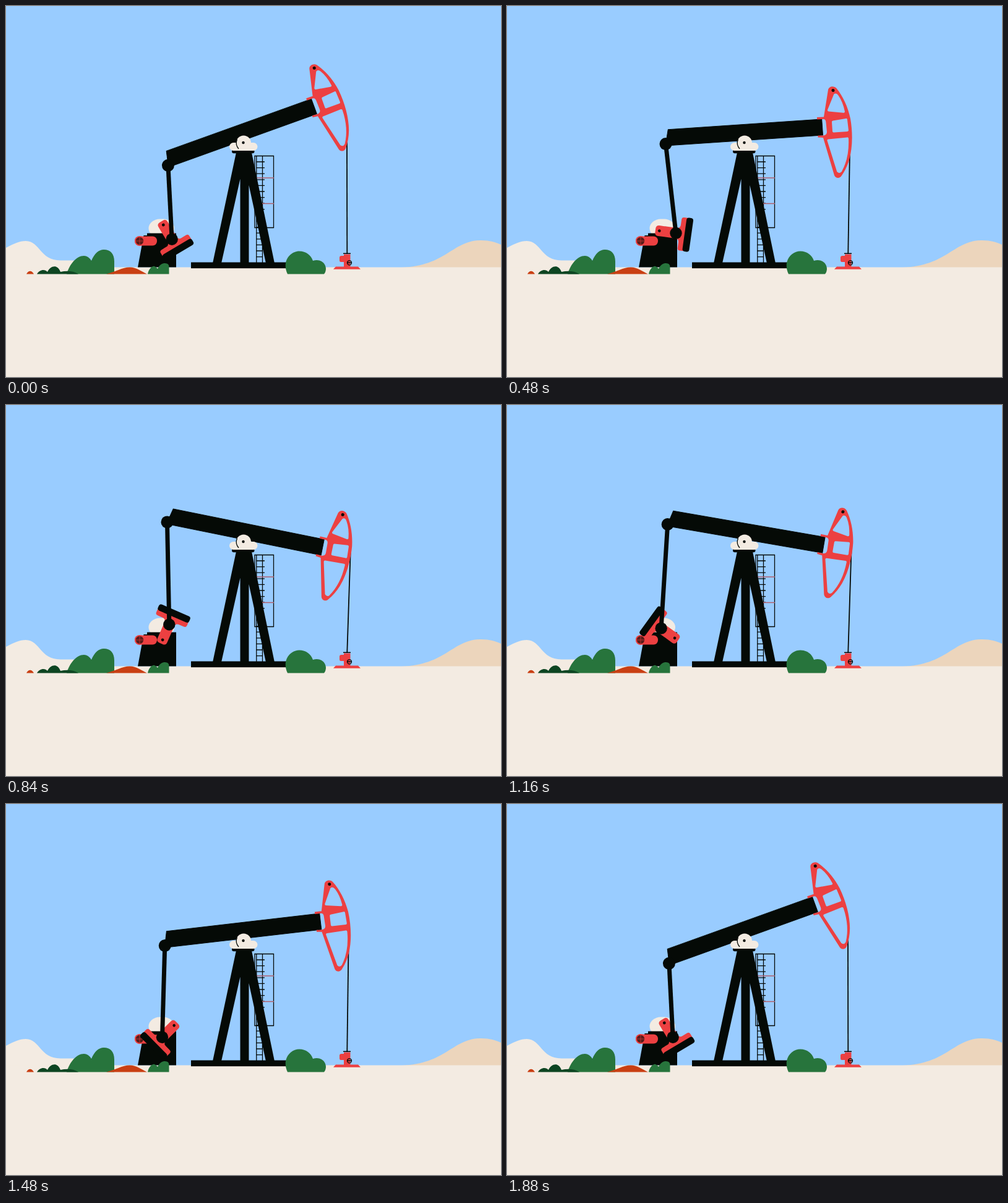
Animation, 800 px wide and 600 px high, one loop 1920 ms. Source, as an HTML page:

```html
<!DOCTYPE html>
<html lang="en">
<head>
<meta charset="utf-8">
<title>Pump jack</title>
<style>
  html, body { margin: 0; height: 100%; overflow: hidden; background: #99ccff; }
  svg { display: block; width: 800px; height: 600px; }
  .ink { fill: #050a06; }
  .red { fill: #ec4041; }
  .sand { fill: #f3ebe2; }
  .sky { fill: #99ccff; stroke: #99ccff; stroke-width: 4; stroke-linejoin: round; }
  .leaf { fill: #27743c; }
  .dark { fill: #0d4522; }
  .clay { fill: #c93f13; }
  .line { fill: none; stroke: #050a06; }
</style>
</head>
<body>
<svg viewBox="0 0 800 600">
  <rect width="800" height="600" fill="#99ccff"/>

  <!-- dunes and ground -->
  <path class="sand" d="M0 391C14 384 21 380 32 380C56 381 54 411 88 411.500H120L150 424H0Z"/>
  <path fill="#ecd5bc" d="M640 423C712 420 722 379 768 379C782 379 791 382 800 386V424H640Z"/>
  <rect class="sand" y="422.500" width="800" height="178"/>

  <!-- ladder and cage -->
  <path class="line" stroke-width="1.300" d="M402 242.500H432.500V358.500H402ZM404.800 242V415M414.500 242V415"/>
  <path class="line" id="rungs" stroke-width="1.300"/>
  <path fill="none" stroke="#b0606c" stroke-width="1.300" d="M405 278H433M405 319.500H433"/>

  <!-- tower -->
  <path class="ink" d="M372 237H388L348 416H334ZM381 237H397L434 416H420ZM378.500 237H392.500V416H378.500Z"/>
  <rect class="ink" x="299" y="414.500" width="155" height="9.700"/>

  <!-- motor -->
  <rect class="sand" x="230.500" y="344.500" width="41.500" height="30" rx="18"/>
  <path class="ink" d="M228 367.500H275V371H228ZM222.500 371H275V422.500H213Z"/>
  <rect class="red" x="208" y="372.500" width="36" height="15" rx="7"/>
  <circle class="red" cx="216" cy="380" r="8"/>
  <circle cx="216" cy="380" r="6.200" fill="#5a1a18"/>
  <path stroke="#c93a38" stroke-width=".8" d="M210 380H222M216 374V386"/>

  <!-- rope, beam and head -->
  <line class="line" id="rope" y1="220" x2="551.300" y2="400" stroke-width="1.800"/>
  <g id="beam">
    <path class="ink" stroke="#050a06" stroke-linejoin="round" d="M260.300 199.700L508.700 183.100L510.500 209L256.100 226Z"/>
    <path class="red" d="M519 136C520 130 528 128.500 532.500 133C543 146 551 163 555 182C559 205 558.500 230 553 249C550 259 546 267 541 274C538 279.500 531.500 279.500 529 274L511 213L502.500 212.500V209.500L511 209.500Q517.500 209 517 203L515.500 188Q515 182.500 510 183L501 183.500V180L512 179.500Z"/>
    <path class="sky" d="M530 144Q532 143 534 146Q541 156 544 171L520 168.500Z"/>
    <path class="sky" d="M527 187.500L548 184L550 201L528 202.500Z"/>
    <path class="sky" d="M519.500 217.500L550 214.500C551 236 547 253 539 267Q537 269 535 267Z"/>
    <circle class="ink" cx="527" cy="136.500" r="2.500"/>
  </g>

  <!-- pivot -->
  <rect class="ink" x="365" y="232" width="36.500" height="6.300" rx="3"/>
  <rect class="sand" x="361" y="221" width="45.500" height="13" rx="6.500"/>
  <circle class="sand" cx="384" cy="221.500" r="12"/>
  <path class="line" stroke-width="1.300" d="M373.500 215.500Q370 224 376 231"/>
  <circle class="ink" cx="383.500" cy="221" r="2.200"/>

  <!-- crank and rod -->
  <g id="crank">
    <path class="red" d="M-1-8.500H28Q33-9 33-14V-23Q33-27 37-27H43V27H37Q33 27 33 23V14Q33 9 28 8.500H-1Q-6.500 8.500-6.500 3V-3Q-6.500-8.500-1-8.500Z"/>
    <rect class="ink" x="41" y="-27.500" width="11" height="55" rx="4"/>
    <circle class="ink" r="2.300"/>
  </g>
  <line class="line" id="rod" stroke-width="7"/>
  <circle class="ink" id="joint" r="10"/>
  <circle class="ink" id="pin" r="9.700"/>

  <!-- wellhead -->
  <path class="red" d="M533 421.500H546V414H541Q539 414 539 411V407Q539 404 542 404H546V401.500H556.500V421.500H569L573 425.800H529Z"/>
  <path class="line" stroke-width="1.600" d="M545 400.300H557M551.500 415.300H558.500"/>
  <circle class="line" cx="555" cy="415.300" r="3.500" stroke-width="1.300"/>

  <!-- plants -->
  <path class="leaf" d="M98 433.500C103 417 114 404 126 404Q133 404 138 412C143 400 150 394 158 394C169 394 175 401 175 413V433.500Z"/>
  <path class="leaf" d="M229 433.500C231 425 236 420 240 421Q243 422 245 425C248 419 252 416 257 416Q263.500 416 263.500 422V433.500Z"/>
  <path class="leaf" d="M455 433.500C445 412 460 396.500 474 396.500C485 396.500 493 403 496 412C508 408 517 416 517 425Q517 430 514 433.500Z"/>
  <path class="dark" d="M50 433.500C54 426 63 425 67 430C72 420 83 417 88 430C98 428 108 428 117 433.500Z"/>
  <path class="clay" d="M162 433.500C177 430 188 422.500 200 422.500C211 422.500 220 430 228 433.500ZM33 433.500C36 427 42 427 45 433.500Z"/>
</svg>
<script>
  const $ = id => document.getElementById(id);
  const RAD = Math.PI / 180, LOOP = 1920, STEP = 40, END = 1880, TOP = 1000;
  const pivot = [383.5, 221], hub = [260.3, 367.2];

  let rungs = "";
  for (let y = 252; y < 412; y += 9.6) rungs += `M404.500 ${y}H${y < 358 ? 418 : 414.5}`;
  $("rungs").setAttribute("d", rungs);

  // Cubic ease with flat ends: handles at (x1, 0) and (x2, 1)
  function ease(x, x1, x2) {
    if (x <= 0 || x >= 1) return x <= 0 ? 0 : 1;
    let lo = 0, hi = 1, s;
    for (let i = 0; i < 30; i++) {
      s = (lo + hi) / 2;
      const at = 3 * (1 - s) * s * ((1 - s) * x1 + s * x2) + s ** 3;
      if (at < x) lo = s; else hi = s;
    }
    return s * s * (3 - 2 * s);
  }

  function turn([cx, cy], x, y, deg) {
    const c = Math.cos(deg * RAD), s = Math.sin(deg * RAD);
    return [cx + x * c - y * s, cy + x * s + y * c];
  }

  function set(id, attrs) {
    for (const key in attrs) $(id).setAttribute(key, attrs[key]);
  }

  function draw() {
    const t = Math.floor(performance.now() % LOOP / STEP) * STEP;
    const swing = 32.4 * (t < TOP
      ? ease(t / TOP, .489, .469)
      : 1 - ease((t - TOP) / (END - TOP), .347, .616));
    const tilt = swing - 15.96;
    const spin = 59.2 - 360 * ease(t / END, .315, .864);
    const [jx, jy] = turn(pivot, -127, 2, tilt);
    const [px, py] = turn(hub, 12.6, -1.6, spin);

    set("beam", { transform: `rotate(${tilt} ${pivot})` });
    set("crank", { transform: `translate(${hub}) rotate(${spin}) translate(-14.4 -1.6)` });
    set("rope", { x1: 551 + .2 * swing });
    set("rod", { x1: jx, y1: jy, x2: px, y2: py });
    set("joint", { cx: jx, cy: jy });
    set("pin", { cx: px, cy: py });
    requestAnimationFrame(draw);
  }
  draw();
</script>
</body>
</html>
```
